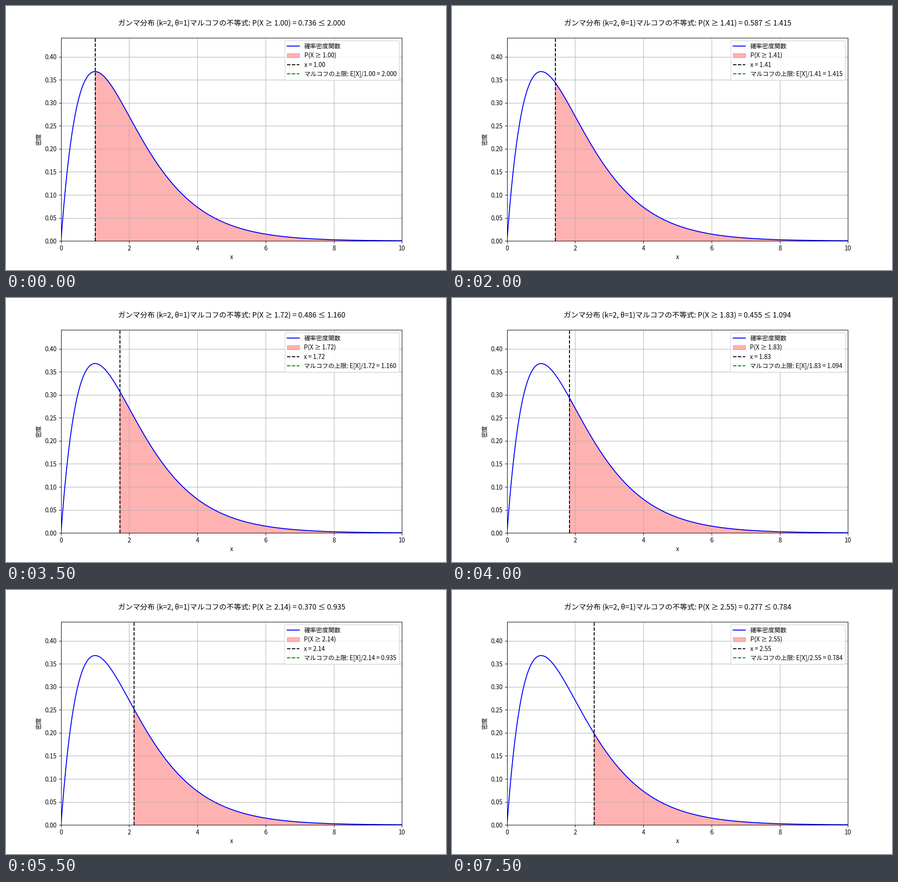
A matplotlib script that plays this animation: 966 px wide and 580 px high, repeating every 8000 ms.

```python
import matplotlib.pyplot as plt
import numpy as np
from matplotlib.animation import FuncAnimation

plt.rcParams["font.family"] = "Noto Sans CJK JP"

WIDTH, HEIGHT, DPI = 966, 580, 96.6
FRAMES, INTERVAL = 16, 500
STEP = 3 / 29
MEAN = 2.0
X_MAX = 10
NUDGE = 0.005  # under half a pixel to the right, for the marker line


def pdf(x):
    return x * np.exp(-x)


def tail(x):
    return (1 + x) * np.exp(-x)


# The tiny margin keeps the pixel size from being truncated downwards.
fig, ax = plt.subplots(figsize=((WIDTH + 1e-6) / DPI, (HEIGHT + 1e-6) / DPI), dpi=DPI)
xs = np.linspace(0, X_MAX, 1000)


def draw(i):
    a = 1 + STEP * i
    bound = MEAN / a
    event = f"P(X ≥ {a:.2f})"
    right = np.linspace(a, X_MAX, 500)

    ax.clear()
    ax.plot(xs, pdf(xs), color="blue", label="確率密度関数")
    ax.fill_between(right, pdf(right), color="red", alpha=0.3, label=event)
    ax.axvline(a + NUDGE, color="black", linestyle="--", snap=False,
               label=f"x = {a:.2f}")
    ax.axhline(bound, color="green", linestyle="--",
               label=f"マルコフの上限: E[X]/{a:.2f} = {bound:.3f}")

    ax.set_xlim(0, X_MAX)
    ax.set_ylim(0, 1.2 * pdf(1))
    ax.set_xlabel("x")
    ax.set_ylabel("密度")
    ax.set_title(f"ガンマ分布 (k=2, θ=1)マルコフの不等式: "
                 f"{event} = {tail(a):.3f} ≤ {bound:.3f}", pad=20)
    ax.legend(loc="upper right", labelspacing=0.465)
    ax.grid(True)
    return []


anim = FuncAnimation(fig, draw, frames=FRAMES, init_func=lambda: draw(0),
                     interval=INTERVAL, repeat=True, repeat_delay=0, blit=False)
plt.show()
```
